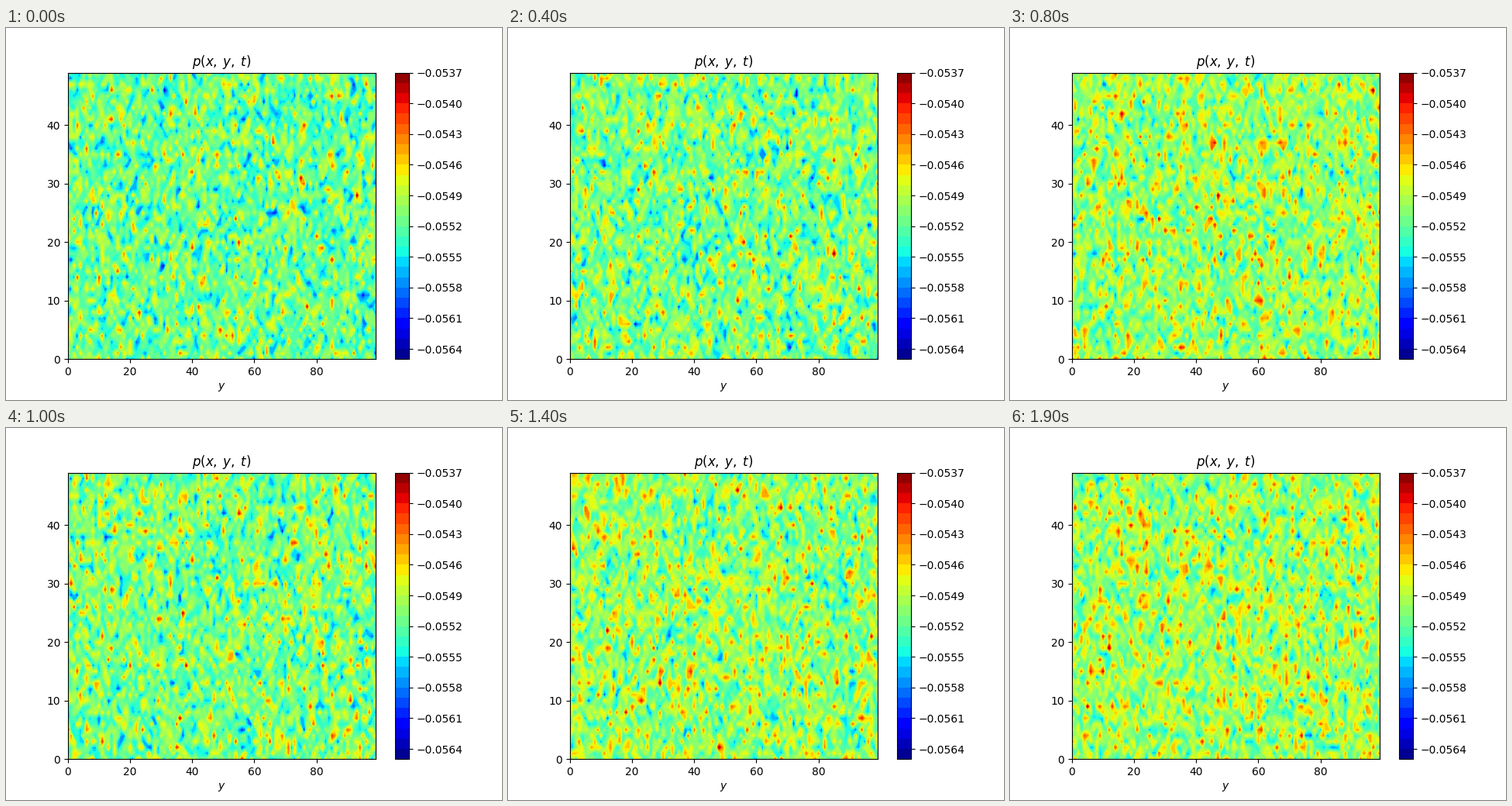
A matplotlib script that plays this animation: 640 by 480 pixels, repeating every 2000 ms.

```python
import numpy as np
import matplotlib.pyplot as plt
from matplotlib.animation import FuncAnimation

FRAMES, INTERVAL = 20, 100
NX, NY = 100, 50
SIGMA = 0.00037
LEVELS = np.round(np.linspace(-0.0565, -0.0537, 29), 4)

plt.rcParams["text.kerning_factor"] = 6


def mean_pressure(step):
    """Slow rise with a small wobble."""
    rise = 0.00014 * step / (FRAMES - 1)
    return -0.05515 + rise - 0.00006 * np.cos(2 * np.pi * step / 5)


def field(step):
    rng = np.random.default_rng(100 + step)
    p = rng.normal(mean_pressure(step), SIGMA, (NY, NX))
    margin = 2e-5
    return np.clip(p, LEVELS[0] + margin, LEVELS[-1] - margin)


def draw_field(step):
    return ax.contourf(field(step), levels=LEVELS, cmap="jet")


fig, ax = plt.subplots(figsize=(6.4, 4.8), dpi=100)
contours = draw_field(0)
fig.colorbar(contours, ax=ax, ticks=LEVELS[1::3])
ax.set_title(r"$p(x,\;y,\;t)$")
ax.set_xlabel("$y$")


def update(step):
    global contours
    contours.remove()
    contours = draw_field(step)
    return [contours]


anim = FuncAnimation(fig, update, frames=FRAMES, interval=INTERVAL,
                     init_func=lambda: update(0), repeat=True,
                     repeat_delay=0, blit=False)
plt.show()
```
